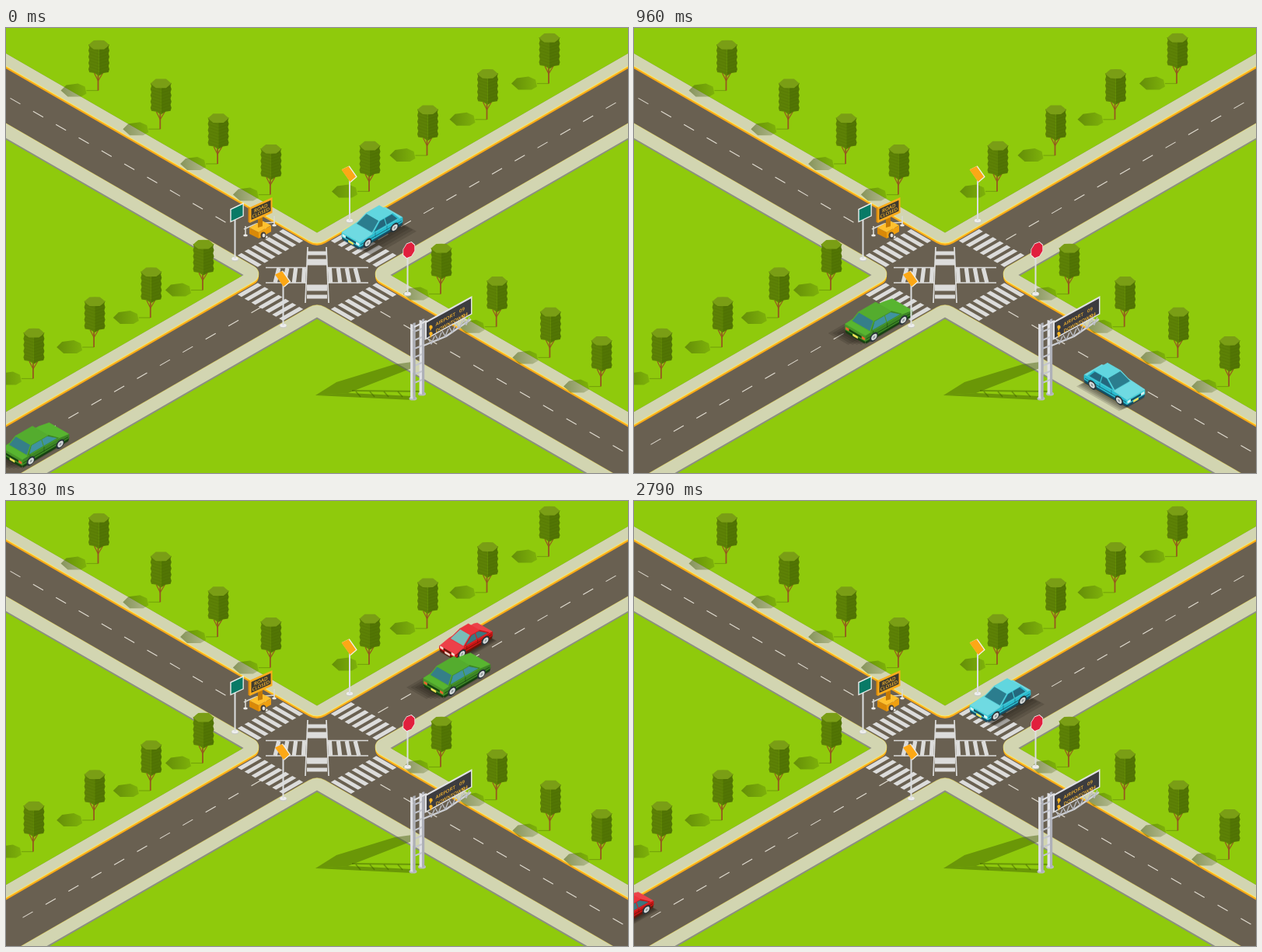
An HTML page with a canvas for the animation above (2830 ms loop, 800x573 px).

```html
<!DOCTYPE html>
<html lang="en">
<head>
<meta charset="utf-8">
<title>Crossroads</title>
<style>
html, body { margin: 0; width: 100%; height: 100%; overflow: hidden; background: #8fca0c; }
canvas { display: block; }
</style>
</head>
<body>
<canvas id="stage" width="800" height="573"></canvas>
<script>
const ctx = document.getElementById('stage').getContext('2d');
const LOOP = 2830, STEP = 125 / 3, K = 0.577, CX = 400, CY = 318;
const GRASS = '#8fca0c', ROAD = '#696051', PAVE = '#d2d5b1', PAINT = '#dcdcdb';

function trace(pts) {
  ctx.beginPath();
  pts.forEach(([x, y], i) => i ? ctx.lineTo(x, y) : ctx.moveTo(x, y));
}
function poly(color, pts, edge = 0) {
  trace(pts);
  ctx.closePath();
  ctx.fillStyle = color;
  ctx.fill();
  if (edge) {
    ctx.strokeStyle = color;
    ctx.lineWidth = edge;
    ctx.lineJoin = 'round';
    ctx.stroke();
  }
}
function line(color, width, ...pts) {
  trace(pts);
  ctx.strokeStyle = color;
  ctx.lineWidth = width;
  ctx.stroke();
}
function oval(color, x, y, rx, ry = rx) {
  ctx.beginPath();
  ctx.ellipse(x, y, rx, ry, 0, 0, Math.PI * 2);
  ctx.fillStyle = color;
  ctx.fill();
}
// Upright panel: w wide, h high, its lower left corner at x, y.
function panel(color, x, y, w, h, slope) {
  poly(color, [[x, y], [x + w, y + w * slope], [x + w, y + w * slope - h], [x, y - h]]);
}
function slantText(text, x, y, size, slope) {
  ctx.save();
  ctx.transform(1, slope, 0, 1, x, y);
  ctx.font = `600 ${size}px "Open Sans", Arial, sans-serif`;
  ctx.fillStyle = '#f8b72f';
  ctx.fillText(text, 0, 0);
  ctx.restore();
}
const range = (n, f) => Array.from({ length: n }, (_, i) => f(i));
const iso = (u, v) => [CX + u + v, CY + K * (u - v)];
const fan = [-1, 1].flatMap(u => [-1, 1].map(v => [u, v]));

// A block between two road arms; su, sv give the side of each road axis.
function wedge(su, sv, gap, radius, dy, color) {
  const far = 900;
  const [a, b, c, d] = [[far, gap], [gap, gap], [gap, far], [far, far]].map(([u, v]) => iso(su * u, sv * v));
  ctx.beginPath();
  ctx.moveTo(a[0], a[1] + dy);
  ctx.arcTo(b[0], b[1] + dy, c[0], c[1] + dy, radius);
  ctx.lineTo(c[0], c[1] + dy);
  ctx.lineTo(d[0], d[1] + dy);
  ctx.closePath();
  ctx.fillStyle = color;
  ctx.fill();
}
function block(su, sv) {
  const r = su === sv ? 11 : 21;
  wedge(su, sv, 32, r, 1.9, '#fbaa19');
  wedge(su, sv, 32, r, -0.6, '#fff05a');
  wedge(su, sv, 32, r, -1.3, PAVE);
  ctx.strokeStyle = 'rgba(255,236,90,.6)';
  ctx.lineWidth = 0.8;
  ctx.stroke();
  ctx.save();
  wedge(su, sv, 47.2, 0, 0, '#8b8d82');
  ctx.clip();
  wedge(su, sv, 47.2, 0, 2.2, GRASS);
  ctx.restore();
}

function dashes(x0, x1, slope) {
  const n = Math.round((x1 - x0) / 29.4), gap = (x1 - x0) / n;
  for (let i = 0; i <= n; i++) {
    const x = x0 + i * gap, y = CY + (x - CX) * slope;
    line('#e2ddd2', 1.1, [x - 6.5, y - 6.5 * slope], [x + 6.5, y + 6.5 * slope]);
  }
}
function zebra(onU, sign) {
  const at = (l, w) => onU ? iso(l, w) : iso(w, l);
  for (let i = -3; i <= 3; i++) {
    const w = i * 8.9, a = sign * 47, b = sign * 73;
    poly(PAINT, [at(a, w - 2.5), at(b, w - 2.5), at(b, w + 2.5), at(a, w + 2.5)]);
  }
}
function crossing() {
  for (const s of [-1, 1]) {
    zebra(true, s);
    zebra(false, s);
    const out = CX + s * 66, inn = CX + s * 13;
    line(PAINT, 1.6, [out, CY - 9.5], [inn, CY - 9.5]);
    line(PAINT, 1.6, [out, CY + 10], [inn, CY + 10]);
    line(PAINT, 1.7, [CX + s * 12, CY - 36], [CX + s * 15, CY + 36]);
    for (let i = 0; i < 4; i++) {
      const x = CX + s * (17 + i * 11.5), lean = s * (0.6 + i * 0.6);
      line(PAINT, 5.2, [x - lean, CY - 9], [x + lean, CY + 10]);
    }
    line(PAINT, 8, [CX - 13, CY + s * 16.5], [CX + 13, CY + s * 16.5]);
    line(PAINT, 5, [CX - 13, CY + s * 28], [CX + 13, CY + s * 28]);
  }
}

// Four rows of four trees: start, step and a slight bend of the row.
const row = (x, y, dx, dy, bx, by) => range(4, i => {
  const bend = i % 3 ? 1 : 0;
  return [x + i * dx + bend * bx, y + i * dy + bend * by];
});
const trees = [
  ...row(119.5, 15, 73.8, 44.7, 6, 5), ...row(699, 6, -77, 46.3, -2.5, 0),
  ...row(254, 272, -72.7, 38, 5.5, -2.5), ...row(560, 277, 68.7, 39.7, 3, 2.5)
].sort((a, b) => a[1] - b[1]);

function treeShade([x, y]) {
  const cx = x - 32, cy = y + 65.5;
  const g = ctx.createLinearGradient(cx - 17, 0, cx + 17, 0);
  g.addColorStop(0, 'rgba(58,82,4,.5)');
  g.addColorStop(1, 'rgba(58,82,4,.2)');
  poly(g, [[cx - 17, cy], [cx - 10, cy - 7], [cx + 5, cy - 9], [cx + 14, cy - 5],
    [cx + 16, cy + 4], [cx + 9, cy + 8], [cx - 8, cy + 8]]);
  line('rgba(58,82,4,.3)', 1.2, [cx + 16, cy], [x - 1, cy]);
}
function tree([x, y]) {
  ctx.save();
  ctx.translate(x, y);
  line('#96581f', 1.8, [-1, 42], [-1, 65.5]);
  line('#96581f', 1.2, [-6, 43], [-1, 53], [5, 43]);
  const face = (side, color) => poly(color, [
    [0, 9], ...range(10, i => [side * (i % 2 ? 12.3 : 13.5), 6 + i * 4]), [side * 6, 43], [0, 46.5]]);
  face(-1, '#5d8106');
  face(1, '#527504');
  for (let i = 0; i < 8; i++)
    line('rgba(49,75,0,.1)', 1, [-12, 11 + i * 4], [0, 15 + i * 4], [12, 11 + i * 4]);
  poly('#7a9e15', range(12, i => {
    const a = i * Math.PI / 6, r = i % 2 ? 0.88 : 1;
    return [13.3 * r * Math.cos(a), 6.7 - 6.7 * r * Math.sin(a)];
  }));
  ctx.restore();
}

function pole(x, y0, y1) {
  oval('#c9cbc4', x, y1 + 0.8, 4.6, 2.6);
  oval('#efefed', x, y1, 4.2, 2.2);
  line('#dcdee0', 2, [x, y0], [x, y1]);
}
function prioritySign(x, y) {
  pole(x + 1, y + 8, y + 61);
  const plate = (color, d, edge) => poly(color,
    [[x - 9.5 + d, y - 4.5], [x - 0.5 + d, y - 9], [x + 9 + d, y + 4.5], [x + 1.5 + d, y + 11]], edge);
  plate('#f1efe8', 1, 1.2);
  plate('#fca816', 0, 0);
}
function stopSign() {
  pole(516.5, 292, 342);
  const disc = (color, r) => poly(color, range(8, i => {
    const a = (i + 0.5) * Math.PI / 4, c = Math.cos(a);
    return [518.3 + r * 0.8 * c, 286 + r * Math.sin(a) - r * 0.3 * c];
  }));
  disc('#f5eeee', 10.6);
  disc('#e11f3d', 9.6);
}
function tealSign() {
  pole(294.5, 246, 297);
  panel('#edf0ef', 288.3, 250.5, 17.5, 17.5, -0.47);
  panel('#087a66', 289.7, 248.5, 14.8, 14.5, -0.47);
}
function trailer() {
  line('#d8d8d2', 1.6, [306, 259], [322, 252], [346, 250]);
  for (const [x, y] of [[308, 267], [334, 269], [345, 254]]) {
    line('#d8d8d2', 1.6, [x, y - 12], [x, y]);
    oval('#eeeeea', x, y, 2.8, 1.5);
  }
  panel('#d98908', 313, 265, 12, 8, 0.5);
  panel('#f0a010', 325, 271, 16, 8, -0.55);
  poly('#ffc02e', [[313, 257], [329, 248], [341, 254], [325, 263]]);
  panel('#c47a05', 324, 257, 6, 12, -0.3);
  oval('#4a4238', 331, 267, 3.6, 4.6);
  oval('#e3e1da', 331.5, 267, 1.9, 2.6);
  panel('#d98a0a', 311.5, 250, 3, 19.5, 0.3);
  panel('#fbac1c', 313.5, 251, 29, 20, -0.45);
  panel('#3f3a2d', 315.5, 247, 25, 14, -0.45);
  slantText('ROAD', 319, 238, 6.3, -0.45);
  slantText('CLOSED', 316.5, 245, 6, -0.45);
}
function gantryShade() {
  const shade = 'rgba(60,90,0,.45)';
  poly(shade, [[398, 473], [425, 456], [500, 433], [522, 430], [522, 438], [440, 470]]);
  poly(shade, [[440, 470], [522, 474], [522, 479], [398, 473]]);
  line(shade, 2, [445, 467], [536, 468]);
  for (let x = 450; x < 520; x += 18) line(shade, 1.6, [x, 468], [x + 6, 475]);
}
function gantry() {
  const light = '#dfe0e4', dark = '#aeb0b8';
  const post = (x, y0, y1) => {
    oval('#b9bbc0', x, y1, 5, 2.6);
    panel(light, x - 3.4, y1, 3.5, y1 - y0, 0.2);
    panel(dark, x, y1 + 1, 3.2, y1 - y0 + 2, -0.2);
  };
  post(535, 376, 471);
  for (let y = 391; y < 468; y += 11) line('#c4c6cd', 2, [525, y], [535, y - 4]);
  line('#cfd1d6', 2.2, [537, 409], [566, 397], [598, 375]);
  for (let x = 543; x < 590; x += 9) {
    const y = 404 - (x - 543) * 0.55;
    line('#b9bbc2', 1.4, [x, y - 4], [x + 4, y + 3], [x + 8, y - 7]);
  }
  post(523.5, 381, 477);
  line(light, 2, [525, 385], [541, 377]);
  panel('#e1e2e5', 538.5, 402, 61, 23.5, -0.55);
  panel('#3c3c3f', 541, 399, 57, 19.5, -0.55);
  ['AIRPORT 09', 'DOWNTOWN 04'].forEach((text, i) => {
    const y = 384 + i * 8.6, [place, km] = text.split(' ');
    oval('#f9b522', 546.5, y + 1, 2.2, 2.6);
    line('#f9b522', 1.5, [546.5, y + 1], [546, y + 5.5]);
    slantText(place, 552.5, y, 6, -0.55);
    slantText(km, 583 + i * 4, y - 17 - i * 2, 6, -0.55);
  });
}

// a: length from the near end, b: width from the near side, h: height.
// glass: base and top of the near pane, top and base of the far one.
function paint(h, s, l) {
  const tone = (k, dh = 0) => `hsl(${h + dh},${s}%,${l * k}%)`;
  return { top: tone(1), lid: tone(0.95), end: tone(0.83), side: tone(0.74, 3), sill: tone(0.36, 12) };
}
const blueCar = { ...paint(184, 66, 66), L: 55, W: 23, hood: 10.5, belt: 12, roof: 20.5, tail: 12,
  glass: [17, 28, 45, 51], r: 5.4, pane: '#2b7d8e', win: '#24687d', lamp: '#d9f4f2', plate: '#f4e45a', shade: [18, 7] };
const greenCar = { ...paint(102, 58, 45), L: 60, W: 26, hood: 12, belt: 12.5, roof: 21, tail: 11,
  glass: [7, 14, 36, 47], r: 5.4, pane: '#357f88', win: '#3f93a0', lamp: '#f0642f', plate: '#f4e45a', shade: [-22, 0] };
const redCar = { ...paint(357, 82, 59), L: 48, W: 20, hood: 8, belt: 11, roof: 18.5, tail: 11,
  glass: [12, 23, 34, 44], r: 5.2, pane: '#79bdb8', win: '#3c7880', lamp: '#f7e3d5', plate: '#f3d9cc', shade: [6, 2] };

function car(c, x, y, flip) {
  const { L, W, hood, belt, roof, tail, r } = c, [g0, g1, g2, g3] = c.glass;
  const p = (a, b, h) => [a - b - (L - W) / 2, K * ((L + W) / 2 - a - b) - h];
  const quad = (color, ...q) => poly(color, q.map(v => p(...v)), 0.7);
  const onEnd = (color, b0, b1, h0, h1) => quad(color, [0, b0, h0], [0, b1, h0], [0, b1, h1], [0, b0, h1]);
  ctx.save();
  ctx.translate(x, y + 2);
  if (flip) ctx.scale(-1, 1);
  const [sx, sy] = flip ? [10, 4] : c.shade;
  for (let i = 0; i <= 4; i++) {
    ctx.save();
    ctx.translate(sx * i / 4, sy * i / 4);
    poly('rgba(28,24,18,.16)', [p(0, 0, 0), p(L, 0, 0), p(L, W, 0), p(0, W, 0)]);
    ctx.restore();
  }
  // body shell
  quad(c.sill, [1, 0, 1.5], [L - 1, 0, 2], [L, 0, 6], [0, 0, 6]);
  quad(c.sill, [0, 1, 1.5], [0, W - 1, 1.5], [0, W, 6], [0, 0, 6]);
  quad(c.side, [0, 0, 4.5], [L, 0, 5], [L, 0, tail - 1], [g3, 0, belt], [g0, 0, belt], [0, 0, hood]);
  quad(c.end, [0, 0, 4.5], [0, W, 4.5], [0, W, hood], [0, 0, hood]);
  quad(c.top, [0, 0, hood], [g0, 0, belt], [g3, 0, belt], [L, 0.5, tail - 1],
    [L, W - 0.5, tail - 1], [g3, W, belt], [g0, W, belt], [0, W, hood]);
  line(c.sill, 0.8, p(1, 0, 7), p(L - 1, 0, 7));
  // near end details
  onEnd(c.sill, 5, W - 5, 6, 8);
  onEnd(c.lamp, 1, 4.5, 5.8, 8.2);
  onEnd(c.lamp, W - 4.5, W - 1, 5.8, 8.2);
  onEnd(c.plate, W / 2 - 3, W / 2 + 3, 2.6, 4.8);
  // cabin
  quad(c.side, [g0, 0.5, belt], [g1, 3, roof], [g2, 3, roof], [g3, 0.5, belt]);
  quad(c.win, [g0 + 3, 0.7, belt + 0.8], [g1 + 1, 2.8, roof - 1.2], [g2 - 1, 2.8, roof - 1.2], [g3 - 2.5, 0.7, belt + 0.8]);
  const mid = (g0 + g3) / 2 + 1;
  line(c.end, 1.1, p(mid, 0.6, belt), p(mid - 0.5, 3, roof));
  quad(c.lid, [g0, 1, belt], [g0, W - 1, belt], [g1, W - 3, roof], [g1, 3, roof]);
  quad(c.pane, [g0 + 0.6, 2, belt + 0.4], [g0 + 0.6, W - 2, belt + 0.4], [g1 - 0.3, W - 4, roof - 0.4], [g1 - 0.3, 4, roof - 0.4]);
  quad(c.lid, [g1, 3, roof], [g2, 3, roof], [g2, W - 3, roof], [g1, W - 3, roof]);
  for (const a of [mid, g0 + 3]) line(c.sill, 0.5, p(a, 0, 6), p(a, 0, belt));
  // wheels
  for (const a of [L * 0.18, L * 0.81]) {
    const [wx, wy] = p(a, 0, 4);
    ctx.save();
    ctx.transform(1, -K, 0, 1, wx, wy);
    oval('#28343a', 0, 0, r);
    oval('#d5d9d8', 0.4, 0.3, r * 0.68);
    oval('#8f999c', 0.4, 0.3, r * 0.28);
    ctx.restore();
  }
  ctx.restore();
}

const ease = (t, start, span) => {
  const u = Math.min(1, Math.max(0, (t - start) / span));
  return u * u * (3 - 2 * u);
};
// Brakes at the crossing, then pulls away again.
const greenX = t => 38 + 297 * ease(t, 25, 1113) + 671 * ease(t, 1138, 1692);
const redX = t => { const d = t - 2130; return 379 - 0.671 * d + 0.000126 * d * d; };
const blueIn = t => 471 + (2790 - t) * 0.465;
const blueSlow = t => 402 + 69 * (1 - t / 420) ** 2;
const blueOut = t => 429 + (t - 540) * 0.45;

function traffic(t) {
  const onB = (c, x, y0) => car(c, x, y0 - K * (x - CX));
  const blueY = 303;
  if (t < 460) onB(blueCar, blueSlow(t), blueY);
  else if (t < 1600) {
    const x = blueOut(t);
    car(blueCar, x, 339 + K * (x - CX), true);
  } else if (t >= 2080) onB(blueCar, blueIn(t), blueY);
  if (t >= 1620) onB(redCar, redX(t), 295);
  if (t < 2400) onB(greenCar, greenX(t), 332);
}

function scene(t) {
  ctx.fillStyle = ROAD;
  ctx.fillRect(0, 0, 800, 573);
  for (const [u, v] of fan) block(u, v);
  dashes(12, 276, K);
  dashes(488, 787, K);
  dashes(485, 778, -K);
  dashes(28, 322, -K);
  crossing();
  trees.forEach(treeShade);
  gantryShade();
  trees.forEach(tree);
  trailer();
  tealSign();
  prioritySign(441, 187);
  traffic(t);
  stopSign();
  prioritySign(355.5, 322);
  gantry();
}

function tick() {
  const now = performance.now() % LOOP;
  const i = Math.min(67, Math.floor((now + 4) / STEP));
  scene(Math.round(i * STEP / 10) * 10);
  requestAnimationFrame(tick);
}
tick();
</script>
</body>
</html>
```
